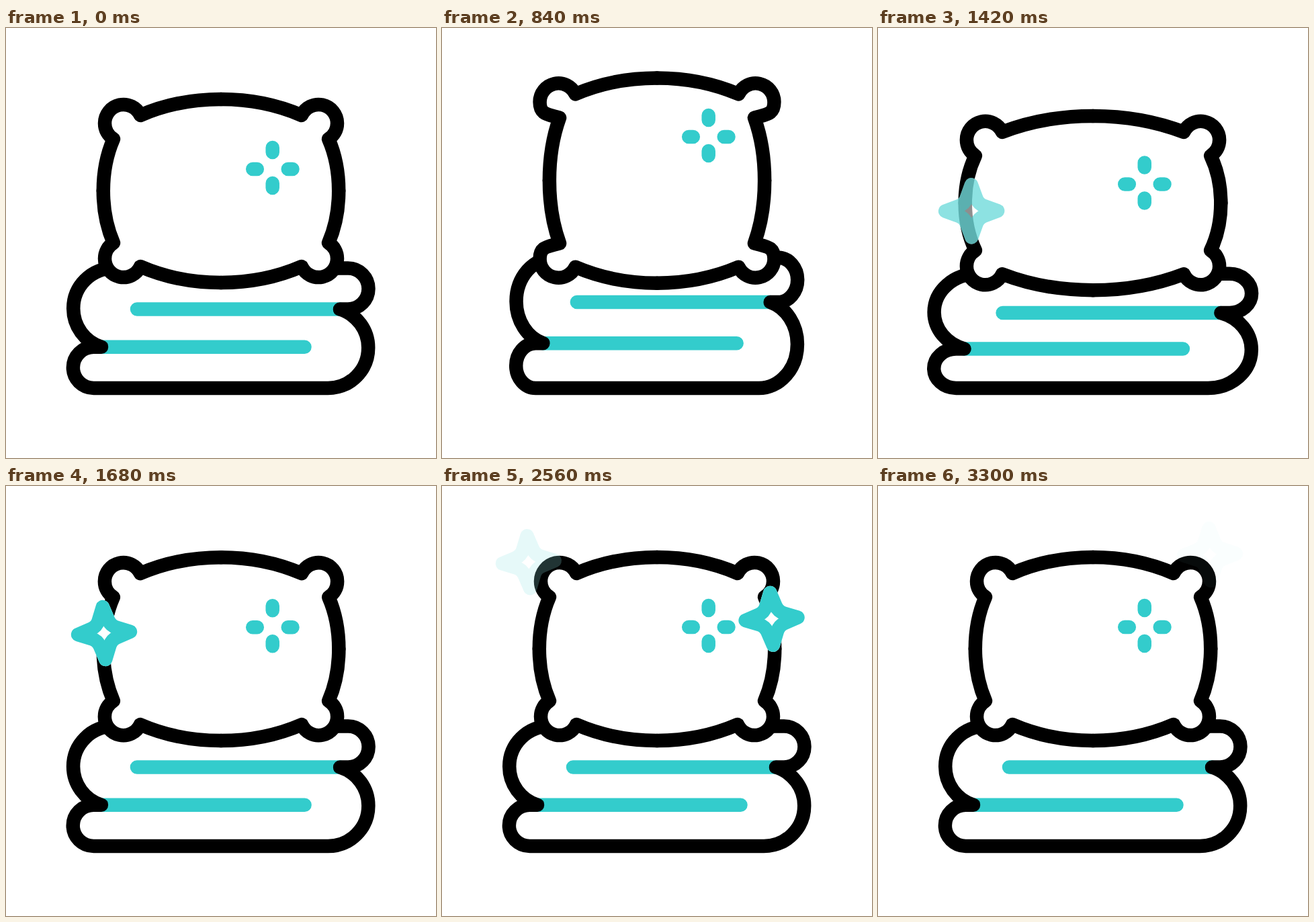
An HTML page that plays this animation: 640x640 px, repeating every 3.6 s.

```html
<!DOCTYPE html>
<html lang="en">
<head>
<meta charset="utf-8">
<title>Pillow and blanket</title>
<style>
  html, body { margin: 0; width: 100%; height: 100%; overflow: hidden; background: #fff; }
  svg {
    display: block; width: 100vw; height: 100vh;
    fill: none; stroke: #000; stroke-width: 20.5; stroke-linecap: round; stroke-linejoin: round;
  }
  .teal { stroke: #3cc; }
  .white { fill: #fff; stroke: #fff; }
  #pillow { fill: #fff; }
  #blanket path { vector-effect: non-scaling-stroke; }
</style>
</head>
<body>
<svg viewBox="0 0 640 640">
  <defs>
    <path id="quarter"/>
    <path id="star"/>
  </defs>
  <g id="blanket">
    <path class="teal" d="M-125 -117.5H177M-178 -61.3H124.5"/>
    <path d="M150 -178.5H189A30.5 30.5 0 0 1 189 -117.5H177A60 60 0 0 1 219.2 -60A60 60 0 0 1 159.2 0H-189.5A30.5 30.5 0 0 1 -189.5 -61.3H-178A60 60 0 0 1 -219.8 -118.5A60 60 0 0 1 -159.8 -178.5"/>
  </g>
  <g id="pillow">
    <use href="#quarter"/>
    <use href="#quarter" transform="scale(-1 1)"/>
    <use href="#quarter" transform="scale(1 -1)"/>
    <use href="#quarter" transform="scale(-1 -1)"/>
  </g>
  <path id="sparkle" class="teal" d="M396.7 178v7M396.7 231v7M367.2 210h6.6M419.7 210h6.8"/>
  <g id="star1"><use href="#star" class="white"/><use href="#star" class="teal"/></g>
  <g id="star2"><use href="#star" class="white"/><use href="#star" class="teal"/></g>
</svg>
<script>
const LOOP = 3600, HOLD = 3300, FADE = 180;
const $ = id => document.getElementById(id);
const set = (id, name, value) => $(id).setAttribute(name, value);
const clamp = x => Math.max(0, Math.min(1, x));

// Eased 0 to 1 between two times.
function ramp(t, from, to) {
  const x = clamp((t - from) / (to - from));
  return x * x * (3 - 2 * x);
}

// Squash, stretch, squash again at time `again`, then rest.
function bounce(t, again) {
  const up = ramp(t, 470, 910), down = ramp(t, 910, again);
  return {
    squash: ramp(t, 0, 370) - up + down - ramp(t, again, 1700),
    stretch: up - down
  };
}

// Lower right quarter of the pillow, measured from its centre.
function quarterPath(squash, stretch) {
  const r = 27.8;
  const top = 136.5 - 9.5 * squash + 18 * stretch;
  const x = 120 + 21 * squash, y = top - 24;           // notch on the long edge
  const cx = x + 25.2, cy = y - 11.7;                  // corner knob
  const sx = x + 40 - 17.7 * stretch, sy = y - 35.2;   // notch on the side
  const side = sx + 15.2;
  return `M0 ${top}Q${0.54 * x} ${top} ${x} ${y}A${r} ${r} 0 0 0 ${cx + r} ${cy}` +
    `C${cx + r} ${cy - 10 - 10 * stretch} ${sx + 8 + 10 * stretch} ${sy + 5} ${sx} ${sy}` +
    `Q${side} ${0.55 * sy} ${side} 0`;
}

// Four points with softened inner corners.
function starPath() {
  const tip = 39, inner = 10.4, a = 7.3, b = 19;
  let d = '';
  for (let i = 0; i < 4; i++) {
    const turn = (x, y) => [[x, y], [-y, x], [-x, -y], [y, -x]][i].join(' ');
    d += `${i ? 'L' : 'M'}${turn(0, -tip)}L${turn(a, -b)}Q${turn(inner, -inner)} ${turn(b, -a)}`;
  }
  return d + 'Z';
}

// x holds the start, bend and end of a curve; y eases out from `rise` below the end.
const stars = [
  { id: 'star1', from: 1320, to: 2582, x: [135, 163.5, 127.6], y: 113, rise: 182, ease: 1.61 },
  { id: 'star2', from: 2020, to: 3304, x: [495.3, 486, 494], y: 102, rise: 197, ease: 1.32 }
];

function drawStar({ id, from, to, x: [x0, x1, x2], y, rise, ease }, t) {
  const p = clamp((t - from) / (to - from)), q = 1 - p;
  const x = q * q * x0 + 2 * p * q * x1 + p * p * x2;
  const tilt = 3.4 * Math.cos((t - 2080) / 900 * 2 * Math.PI);
  set(id, 'transform', `translate(${x} ${y + rise * q ** ease}) rotate(${tilt})`);
  const alpha = clamp(Math.min(t - from, to - t) / FADE);
  for (const layer of $(id).children) layer.setAttribute('opacity', alpha);
}

function draw(t) {
  const { squash, stretch } = bounce(t, 1270);
  set('quarter', 'd', quarterPath(squash, stretch));
  set('pillow', 'transform', `translate(320 ${242.5 + 25.1 * squash - 18.4 * stretch})`);
  set('blanket', 'transform', 'translate(320 536) ' +
    `scale(${1 + 0.105 * squash - 0.058 * stretch} ${1 - 0.065 * squash + 0.1 * stretch})`);

  const late = bounce(t, 1390);
  set('sparkle', 'transform', `translate(0 ${23 * late.squash - 53.2 * late.stretch})`);
  for (const s of stars) drawStar(s, t);
}

let start;
function tick(now) {
  start ??= now;
  draw(Math.min((now - start) % LOOP, HOLD));
  requestAnimationFrame(tick);
}
set('star', 'd', starPath());
draw(0);
requestAnimationFrame(tick);
</script>
</body>
</html>
```
